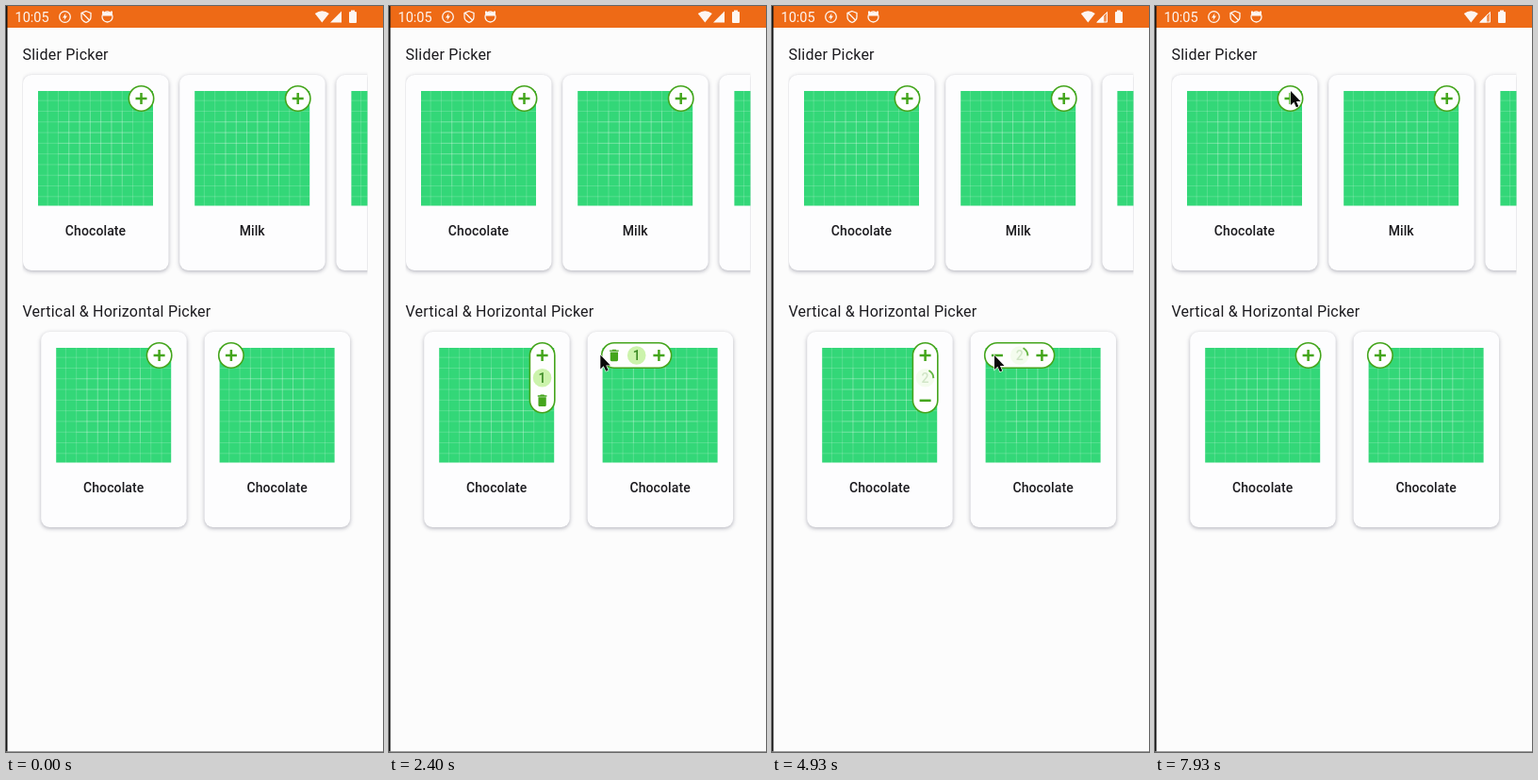
An HTML page with a canvas for the animation above (8 s loop, 400 by 790 pixels).

```html
<!DOCTYPE html>
<html lang="en">
<head>
<meta charset="utf-8">
<title>Slider Picker</title>
<style>
  html, body { margin: 0; width: 100%; height: 100%; overflow: hidden; background: #fcfcfc; }
  canvas { display: block; width: 400px; height: 790px; }
</style>
</head>
<body>
<canvas id="stage"></canvas>
<script>
const LOOP = 8000, LOAD_TIME = 500;
const BG = '#fcfcfc', CARD = '#fdfdfe', INK = '#1c1b1f', GREEN = '#44a51c', BADGE = '#ccf3ac';
const canvas = document.getElementById('stage');
const ratio = window.devicePixelRatio || 1;
canvas.width = 400 * ratio;
canvas.height = 790 * ratio;
const c = canvas.getContext('2d');

const TRASH = new Path2D('M6 19c0 1.1.9 2 2 2h8c1.1 0 2-.9 2-2V7H6zM19 4h-3.5l-1-1h-5l-1 1H5v2h14z');
const BOLT = new Path2D('M1 -4L-2.5 1H-.3L-1 4L2.5 -1H.3Z');
const SHIELD = new Path2D('M0 -6L5 -4V0Q5 4 0 6Q-5 4 -5 0V-4ZM-4 -4L4 4');
const CURSOR = new Path2D('M0 0V15L3.4 11.8L5.9 17.3L8.3 16.2L5.9 10.9H10.5Z');

// Each tap starts a load and leaves the count behind when it ends.
const taps = [
  { at: 1305, count: 1 }, { at: 3180, count: 2 },
  { at: 4780, count: 1 }, { at: 6300, count: 0 }
];
const cursorPath = [
  [700, 400, 540], [1150, 161, 371], [2100, 161, 371], [2700, 287, 368],
  [3900, 287, 370], [4450, 236, 370], [7100, 236, 370], [7800, 144, 90], [8000, 144, 90]
];

const smooth = p => p * p * (3 - 2 * p);

// Critically damped spring, 0 to 1.
function spring(ms) {
  const x = Math.max(0, ms) * 0.02;
  return 1 - (1 + x) * Math.exp(-x);
}

// cubic-bezier(.4, 0, .2, 1)
function standardEase(x) {
  let lo = 0, hi = 1;
  for (let i = 0; i < 16; i++) {
    const s = (lo + hi) / 2, r = 1 - s;
    if (1.2 * s * r * r + 0.6 * s * s * r + s ** 3 < x) lo = s; else hi = s;
  }
  return smooth(lo);
}

function at(x, y, draw, alpha = 1) {
  c.save();
  c.translate(x, y);
  c.globalAlpha *= alpha;
  draw();
  c.restore();
}

function disc(x, y, r) {
  c.beginPath();
  c.arc(x, y, r, 0, 7);
}

function roundRect(x, y, w, h, r) {
  c.beginPath();
  c.roundRect(x, y, w, h, r);
}

function text(str, x, y, font, color, spacing = 0, align = 'left') {
  c.font = font + ' Roboto, sans-serif';
  c.letterSpacing = spacing + 'px';
  c.textAlign = align;
  c.fillStyle = color;
  c.fillText(str, x, y);
}

function icon(kind, x, y, alpha = 1) {
  at(x, y, () => {
    c.fillStyle = GREEN;
    if (kind === 'trash') {
      c.scale(0.69, 0.69);
      c.translate(-12, -12);
      c.fill(TRASH);
      return;
    }
    c.fillRect(-6, -1.25, 12, 2.5);
    if (kind === 'plus') c.fillRect(-1.25, -6, 2.5, 12);
  }, alpha);
}

function statusBar(t) {
  const white = '#fdf6f2';
  c.fillStyle = '#ee6a16';
  c.fillRect(0, 0, 400, 23);
  text('10:05', 9.5, 16.5, '14.5px', white);
  c.strokeStyle = c.fillStyle = white;
  c.lineWidth = 1.3;
  disc(62.5, 11.5, 5.8);
  c.stroke();
  at(62.5, 11.5, () => c.fill(BOLT));
  at(85, 11.5, () => c.stroke(SHIELD));
  disc(107.5, 11.5, 5.5);
  c.stroke();
  c.fillRect(103, 7, 9, 3.5);
  c.fillRect(102, 5.5, 2, 3);
  c.fillRect(111, 5.5, 2, 3);

  c.beginPath();
  c.moveTo(335.3, 17.5);
  c.lineTo(327.8, 8);
  c.quadraticCurveTo(335.3, 2.5, 342.8, 8);
  c.fill();

  const signal = new Path2D('M344 17.5H356V5.5Z');
  if (t < 4100) {
    c.fill(signal);
  } else {
    at(0, 0, () => c.fill(signal), 0.3);
    c.fill(new Path2D('M344 17.5H352V9.5Z'));
    c.lineWidth = 1;
    c.stroke(new Path2D('M345 17H355.5V6.5Z'));
  }
  roundRect(364, 6, 8, 12, 1);
  c.fill();
  c.fillRect(366, 4.5, 4, 2);
}

// Card whose 122px picture has its top left corner at (x, y).
function card(x, y, label) {
  c.save();
  c.shadowColor = 'rgba(60, 60, 85, .38)';
  c.shadowBlur = 4 * ratio;
  c.shadowOffsetY = 1.3 * ratio;
  c.fillStyle = CARD;
  roundRect(x - 16, y - 17, 154.5, 207, 9);
  c.fill();
  c.restore();

  c.fillStyle = '#33d778';
  c.fillRect(x, y, 122, 121.5);
  const unit = 122 / 108;
  c.strokeStyle = 'rgba(255, 255, 255, .2)';
  c.lineWidth = 0.9;
  for (let k = 9; k < 108; k += 10) {
    const spans = k > 19 && k < 89 ? [[0, 108], [19, 89]] : [[0, 108]];
    for (const [from, to] of spans) {
      c.beginPath();
      c.moveTo(x + k * unit, y + from * unit);
      c.lineTo(x + k * unit, y + to * unit);
      c.moveTo(x + from * unit, y + k * unit);
      c.lineTo(x + to * unit, y + k * unit);
      c.stroke();
    }
  }
  text(label, x + 61, y + 153, '500 14px', INK, 0.1, 'center');
}

function pickerState(t) {
  const past = taps.filter(tap => tap.at <= t);
  const last = past[past.length - 1];
  if (!last) return { open: 0, count: 0, busy: 0, elapsed: 0 };
  const elapsed = t - last.at, done = elapsed >= LOAD_TIME;
  const before = past.length > 1 ? past[past.length - 2].count : 0;
  const count = done ? last.count : before;
  const fade = spring(done ? elapsed - LOAD_TIME : elapsed);
  const closing = done && count === 0;
  return {
    open: closing ? 1 - fade : spring(t - taps[0].at),
    count, elapsed,
    busy: done ? 1 - fade : fade
  };
}

function amount(x, y, { count, busy, elapsed, open }) {
  if (count) at(x, y, () => {
    c.fillStyle = BADGE;
    disc(0, 0, 9.8);
    c.fill();
    text(count, 0, 5, '500 14px', '#3b8a24', 0, 'center');
  }, 1 - busy);
  if (busy > 0.01) at(x, y, () => {
    const start = (-90 + 286 * elapsed / 1332) * Math.PI / 180;
    const sweep = 290 * standardEase(Math.min(1, elapsed / 666)) * Math.PI / 180;
    c.strokeStyle = GREEN;
    c.lineWidth = 1.9;
    c.lineCap = 'square';
    c.beginPath();
    c.arc(0, 0, 8.6, start, start + sweep);
    c.stroke();
  }, busy * open);
}

// (x, y) is the top left corner of the pill.
function picker(x, y, state, vertical) {
  const length = 28 + 47.5 * state.open;
  const w = vertical ? 28 : length, h = vertical ? length : 28;
  c.save();
  roundRect(x + 0.8, y + 0.8, w - 1.6, h - 1.6, 13.2);
  c.fillStyle = '#fefefe';
  c.fill();
  c.save();
  c.clip();
  const remove = state.count > 1 ? 'minus' : 'trash';
  const place = (pos, draw) => vertical ? draw(x + 14, y + pos) : draw(x + pos, y + 14);
  const removeAt = vertical ? length - 13.7 : length - 61.5;
  if (state.open > 0.01) {
    place(removeAt, (px, py) => icon(remove, px, py, state.open));
    place(length - 37.7, (px, py) => amount(px, py, state));
  }
  place(vertical ? 14 : length - 14, (px, py) => icon('plus', px, py));
  c.restore();
  roundRect(x + 0.8, y + 0.8, w - 1.6, h - 1.6, 13.2);
  c.strokeStyle = GREEN;
  c.lineWidth = 1.6;
  c.stroke();
  c.restore();
}

function cursor(t) {
  const next = cursorPath.findIndex(key => key[0] > t);
  if (next < 1) return;
  const [t0, x0, y0] = cursorPath[next - 1], [t1, x1, y1] = cursorPath[next];
  const p = smooth((t - t0) / (t1 - t0));
  at(x0 + (x1 - x0) * p, y0 + (y1 - y0) * p, () => {
    c.lineWidth = 1.2;
    c.strokeStyle = '#fff';
    c.fillStyle = '#0a0a0a';
    c.stroke(CURSOR);
    c.fill(CURSOR);
  });
}

function draw(t) {
  c.setTransform(ratio, 0, 0, ratio, 0, 0);
  c.fillStyle = BG;
  c.fillRect(0, 0, 400, 790);
  statusBar(t);
  text('Slider Picker', 17.5, 57, '16px', INK, 0.22);
  text('Vertical & Horizontal Picker', 17.5, 329, '16px', INK, 0.22);

  const closed = { open: 0 };
  c.save();
  c.beginPath();
  c.rect(17.5, 66, 366, 225);
  c.clip();
  ['Chocolate', 'Milk', 'Bread'].forEach((label, i) => {
    const x = 34 + 166.2 * i;
    card(x, 90, label);
    picker(x + 95.5, 84, closed, false);
  });
  c.restore();

  const state = pickerState(t);
  card(53.2, 362, 'Chocolate');
  picker(148.6, 356, state, true);
  card(226.6, 362, 'Chocolate');
  picker(224.9, 356, state, false);

  c.fillStyle = '#141414';
  c.fillRect(0, 0, 1.5, 790);
  c.fillStyle = '#8a8a8a';
  c.fillRect(0, 789.2, 400, 0.8);
  cursor(t);
}

const begin = performance.now();
function tick() {
  draw((performance.now() - begin) % LOOP);
  requestAnimationFrame(tick);
}
tick();
</script>
</body>
</html>
```
